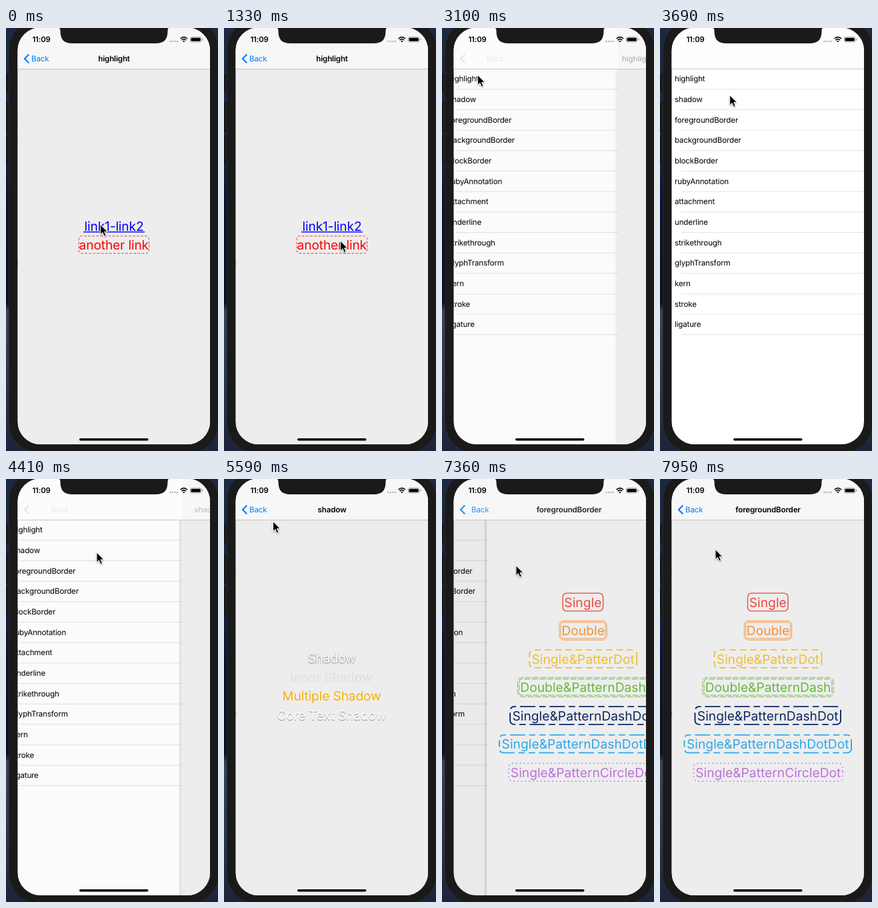
Write an HTML page that moves like this. It is 318x634 px and loops after 8000 ms.

```html
<!DOCTYPE html>
<html lang="en">
<head>
<meta charset="utf-8">
<title>Rich text demo</title>
<style>
  html, body { margin: 0; width: 100%; height: 100%; overflow: hidden; background: #1a1a1a; }
  svg { display: block; width: 318px; height: 634px; }
  text { font-family: Inter, Roboto, "Liberation Sans", sans-serif; white-space: pre; text-rendering: geometricPrecision; }
  .small { font-size: 11.6px; letter-spacing: -.17px; }
  .bold { font-weight: 600; }
  .big { font-size: 19.2px; letter-spacing: -.15px; text-anchor: middle; }
  .wide { letter-spacing: .02px; }
  .mid { text-anchor: middle; }
  .soft { filter: drop-shadow(0 1px 1px rgba(0,0,0,.5)); }
  .hard { filter: drop-shadow(0 1px .4px rgba(0,0,0,.42)); }
  .amber { filter: drop-shadow(0 .8px .3px rgba(170,100,0,.55)) drop-shadow(0 0 1px rgba(255,255,255,.8)); }
  #cursor { filter: drop-shadow(0 1px 1px rgba(0,0,0,.35)); }
</style>
</head>
<body>
<svg viewBox="0 0 318 634" xmlns="http://www.w3.org/2000/svg">
  <defs>
    <clipPath id="screen"><rect x="17.5" y="-.5" width="288.5" height="624.5" rx="34"/></clipPath>
    <linearGradient id="wall" x2="0" y2="1">
      <stop offset="0" stop-color="#1b2943"/>
      <stop offset=".3" stop-color="#18233d"/>
      <stop offset=".42" stop-color="#0a1230"/>
      <stop offset=".65" stop-color="#0a1126"/>
      <stop offset=".67" stop-color="#38445a"/>
      <stop offset=".85" stop-color="#29344d"/>
      <stop offset="1" stop-color="#1c2439"/>
    </linearGradient>
    <linearGradient id="edge">
      <stop offset="0" stop-color="#000" stop-opacity="0"/>
      <stop offset="1" stop-color="#000" stop-opacity=".15"/>
    </linearGradient>
  </defs>

  <rect width="318" height="634" fill="url(#wall)"/>
  <g fill="#1d1e20" stroke="#08090b" stroke-width=".8">
    <rect x=".6" y="69" width="6" height="26" rx="1"/>
    <rect x=".6" y="112.5" width="6" height="43.5" rx="1"/>
    <rect x=".6" y="161.5" width="6" height="42" rx="1"/>
  </g>
  <rect x="4.4" y="-13" width="314.8" height="650" rx="45" fill="#1a1a1a" stroke="#2b2b2d" stroke-width=".8"/>

  <g clip-path="url(#screen)">
    <rect x="17" y="-1" width="290" height="626" fill="#fff"/>
    <g id="list"></g>
    <rect id="dim" x="17" y="-1" width="290" height="626"/>
    <g id="page">
      <rect id="shade" x="12.5" y="62" width="5" height="563" fill="url(#edge)"/>
      <rect x="17.5" y="-1" width="290" height="626" fill="#ededed"/>
      <g id="body0"></g><g id="body1"></g><g id="body2"></g>
    </g>
    <rect x="17" y="-1" width="290" height="62.5" fill="#fcfcfc" fill-opacity=".7"/>
    <rect x="17" y="61.2" width="290" height=".8" fill="#b9b9bb"/>
    <path id="chevron" d="M34.3 39.6 28 46l6.3 6.4" fill="none" stroke="#007aff" stroke-width="2.1"/>
    <text id="back" class="small" x="38" y="50.2" fill="#007aff">Back</text>
    <text id="title" class="small bold mid" x="162" y="50.2"></text>
  </g>

  <path d="M76 -1h171q-4.500 0-4.500 5c0 13-5 19-18 19H99.500c-13 0-18-6-18-19q0-5-5.500-5z" fill="#1a1a1a"/>
  <text class="bold" x="39.4" y="21.2" font-size="11.3" letter-spacing="-.1">11:09</text>
  <g fill="#b4b4b4">
    <circle cx="246.4" cy="20" r="1.2"/><circle cx="249.9" cy="20" r="1.2"/>
    <circle cx="253.4" cy="20" r="1.2"/><circle cx="256.9" cy="20" r="1.2"/>
  </g>
  <g fill="none" stroke="#000" stroke-width="1.6">
    <path d="M261.5 16q5.3-4.6 10.6 0"/>
    <path d="M263.5 18.1q3.3-2.8 6.6 0"/>
  </g>
  <path d="M265 19.6q1.8-1.3 3.6 0l-1.8 1.9z"/>
  <rect x="276.3" y="13.6" width="16.6" height="7.4" rx="2.2" fill="none" stroke="#8c8c8c" stroke-width=".8"/>
  <rect x="277.5" y="14.8" width="14.2" height="5" rx="1.2"/>
  <path d="M294 15.8q1.3.4 1.3 1.5t-1.3 1.5z" fill="#8c8c8c"/>
  <rect x="110" y="615" width="103.5" height="3.6" rx="1.8"/>

  <path id="cursor" d="M0 0V15l3.4-3.1 2.4 5.6 2.7-1.1-2.4-5.5h4.7z" fill="#000" stroke="#fff" stroke-width="1"/>
</svg>

<script>
const $ = id => document.getElementById(id);
const LOOP = 8000, STEP = 146.6, WIDTH = 288.5;

const rows = ['highlight', 'shadow', 'foregroundBorder', 'backgroundBorder', 'blockBorder',
  'rubyAnnotation', 'attachment', 'underline', 'strikethrough', 'glyphTransform', 'kern',
  'stroke', 'ligature'];

const big = (str, x, y, fill, extra = '') =>
  `<text class="big ${extra}" x="${x}" y="${y}" fill="${fill}">${str}</text>`;

// Rounded box whose outline starts halfway down its right side
function box(l, r, mid, h, rad, color, w, dash = '', cap = 'butt') {
  const side = h / 2 - rad, top = r - l - 2 * rad;
  const turn = (x, y) => `a${rad} ${rad} 0 0 1 ${x * rad} ${y * rad}`;
  const d = `M${r} ${mid}v${side}${turn(-1, 1)}h${-top}${turn(-1, -1)}v${-2 * side}` +
    `${turn(1, -1)}h${top}${turn(1, 1)}z`;
  return `<path d="${d}" fill="none" stroke="${color}" stroke-width="${w}"
    stroke-dasharray="${dash}" stroke-linecap="${cap}"/>`;
}

const glow = (id, x, y, w, h) =>
  `<rect id="${id}" x="${x}" y="${y}" width="${w}" height="${h}" rx="4" fill="#c6c6c6"/>`;

// Menu
$('list').innerHTML = rows.map((name, i) => {
  const y = 61.5 + 30.65 * i;
  return `<text class="small" x="22" y="${y + 18.9}">${name}</text>
    <rect x="32" y="${y + 30}" width="275" height=".8" fill="#dcdcde"/>`;
}).join('');

// Highlight page
$('body0').innerHTML =
  glow('hot1', 115, 283, 38, 27) + glow('hot2', 160.5, 283, 48.5, 27) + glow('hot3', 108.5, 311.5, 106.5, 27) +
  big('link1-link2', 162, 303.6, '#00f') +
  '<rect x="116" y="305" width="92" height="1.4" fill="#00f"/>' +
  big('another link', 161.8, 332, '#f00') +
  box(109.2, 214.6, 324.8, 26, 4, '#f02a2a', .9, '3.8 2.3');

// Shadow page
$('body1').innerHTML =
  big('Shadow', 161.5, 275, '#fff', 'soft') +
  big('Inner Shadow', 161.5, 303.5, '#a2a2a2') +
  big('Inner Shadow', 161.8, 304.4, '#f0f0f0') +
  big('Multiple Shadow', 161.5, 332, '#ffb91c', 'amber') +
  big('Core Text Shadow', 161.2, 361, '#fff', 'hard');

// Border page: label, left, right, colour, dash, double, round dots
const borders = [
  ['Single', 131.5, 192, '#f2453d', ''],
  ['Double', 127.5, 196.5, '#f39035', '', true],
  ['Single&amp;PatterDot', 81.5, 242.5, '#f0be32', '9.6 5.8'],
  ['Double&amp;PatternDash', 65, 259, '#62bb38', '9.2 2.3', true],
  ['Single&amp;PatternDashDot', 52.5, 271, '#0b2766', '23 5.8 9.6 5.8'],
  ['Single&amp;PatternDashDotDot', 36.5, 287, '#29a9ec', '23 5.8 9.6 5.8 9.6 5.8'],
  ['Single&amp;PatternCircleDot', 50.5, 274, '#bf6fdc', '0 5.8', false, true]
];
$('body2').innerHTML = borders.map(([label, l, r, color, dash, twin, dots], i) => {
  const mid = 184.5 + 42.5 * i;
  const frame = twin
    ? [-1.1, 1.1].map(d => box(l - d, r + d, mid, 26.4 + 2 * d, 5 + d, color, .9, dash)).join('')
    : box(l, r, mid, 26.8, 6, color, i ? 1.9 : 1.4, dash, dots ? 'round' : 'butt');
  return frame + big(label, (l + r) / 2, mid + 7.2, color, 'wide');
}).join('');

// Page slides: start step, 1 = back to the menu, 0 = open a page
const slides = [[-9, 0], [19.8, 1], [29.9, 0], [40.8, 1], [48.9, 0]];
// Pointer: step, x, y
const path = [[0, 141.5, 294.5], [2, 142, 295], [4, 181, 297], [6, 181, 297], [7, 180, 301],
  [9, 174.5, 319], [11, 174, 321], [13, 172, 320], [14, 164, 290], [16, 90, 130], [18, 47, 44],
  [19, 46, 41], [20, 47, 44], [21, 53.5, 70.5], [23, 78, 90], [26, 118, 106], [29, 135, 111],
  [30, 136, 110], [31, 134, 107], [34, 108, 84], [38, 73.5, 63.5], [40, 50, 46], [41, 51, 48],
  [42, 64, 72], [45, 119, 135.5], [49, 119, 135.5], [52, 95, 118], [54, 83, 105.5]];

function pointer(k) {
  const i = Math.max(1, path.findIndex(p => p[0] >= k));
  const [a, x0, y0] = path[i - 1], [b, x1, y1] = path[i];
  const f = (k - a) / (b - a);
  return [x0 + (x1 - x0) * f, y0 + (y1 - y0) * f];
}

function slide(k) {
  const [start, away] = slides.filter(s => s[0] <= k).pop();
  let rest = Math.exp(-1.6 * (k - start));
  if (rest < .008) rest = 0;
  return { away, p: away ? 1 - rest : rest };
}

const move = (el, x, y = 0) => el.setAttribute('transform', `translate(${x} ${y})`);
const show = (el, on) => el.setAttribute('opacity', +on);
const within = (k, a, b) => k >= a && k <= b;

function draw(k) {
  const { away, p } = slide(k);
  const open = 1 - p;
  const index = k < 26 ? 0 : k < 46 ? 1 : 2;

  move($('list'), -.3 * WIDTH * open);
  show($('dim'), .1 * open);
  move($('page'), WIDTH * p);
  show($('shade'), p > 0 && p < 1 ? (away ? .5 : 1) : 0);
  for (let i = 0; i < 3; i++) show($('body' + i), i === index);

  const pressed = k === 19 || k === 40 ? .3 : 1;
  $('title').textContent = rows[index];
  move($('title'), (away ? 154 : 166) * p);
  move($('back'), (away ? 33 : 35) * p);
  show($('title'), Math.pow(open, away ? .75 : .9));
  show($('back'), Math.pow(open, 1.1) * pressed);
  show($('chevron'), open * pressed);

  show($('hot1'), within(k, 1, 2));
  show($('hot2'), within(k, 6, 7));
  show($('hot3'), within(k, 10, 12));
  move($('cursor'), ...pointer(k));
}

const begin = performance.now();
let last = -1;
function tick() {
  const k = Math.floor(((performance.now() - begin) % LOOP) / STEP);
  if (k !== last) draw(last = k);
  requestAnimationFrame(tick);
}
tick();
</script>
</body>
</html>
```
